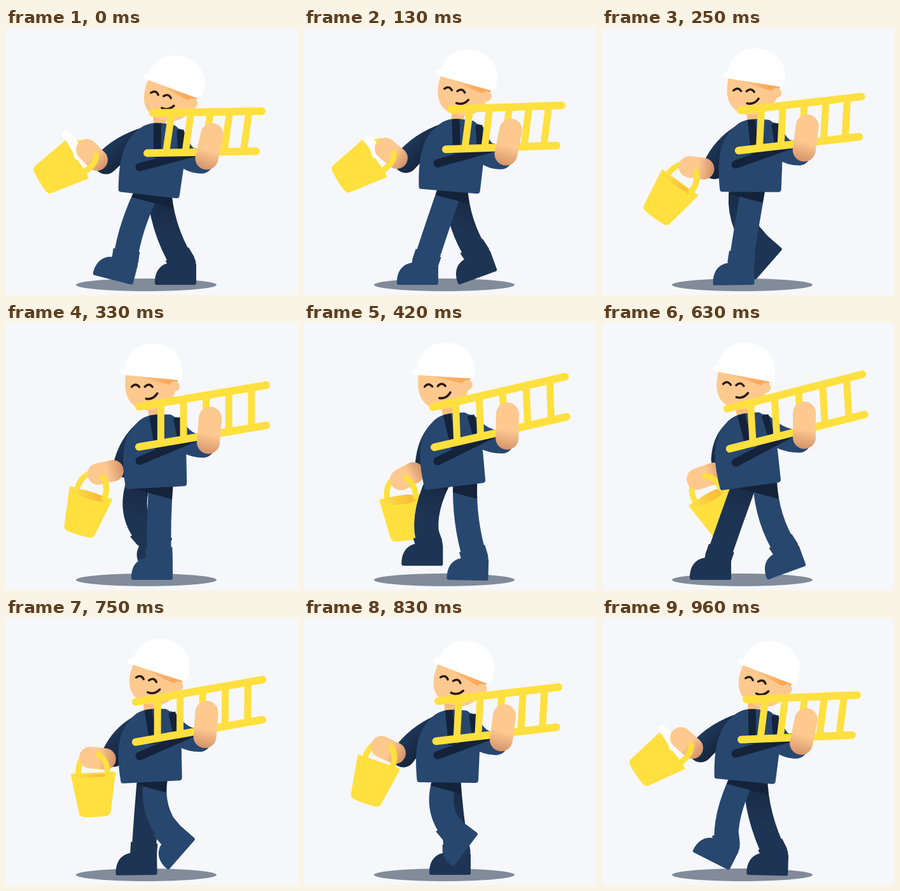
An HTML page with a canvas that plays this animation: 459 by 421 pixels, repeating every 1000 ms.

```html
<!DOCTYPE html>
<html lang="en">
<head>
<meta charset="utf-8">
<title>Walking builder</title>
<style>
  html, body { margin: 0; width: 100%; height: 100%; overflow: hidden; background: #f5f7fb; }
  canvas { display: block; }
</style>
</head>
<body>
<canvas id="stage" width="459" height="421"></canvas>
<script>
const ctx = document.getElementById('stage').getContext('2d');
const FPS = 24, LOOP = 1000, RAD = Math.PI / 180;

const C = {
  bg: '#f5f7fb', ground: '#818b9a', blue: '#27476f', navy: '#1e3454', dark: '#14233a',
  skin: '#fdc98f', tan: '#d4926a', orange: '#fba95c', yellow: '#ffe03f', ink: '#2c1a14'
};

// Periodic cubic through a few poses, positions counted in steps of the walk.
const tracks = (times, period) => (...vals) => k => {
  const n = times.length;
  const t = i => times[(i + n) % n] + Math.floor(i / n) * period;
  const v = i => vals[(i + n) % n];
  const slope = i => (v(i + 1) - v(i - 1)) / (t(i + 1) - t(i - 1));
  k = (k % period + period) % period;
  let i = n - 1;
  while (times[i] > k) i--;
  const h = t(i + 1) - t(i), u = (k - t(i)) / h, w = 1 - u;
  return v(i) * (1 + 2 * u) * w * w + slope(i) * h * u * w * w
       + v(i + 1) * (3 - 2 * u) * u * u - slope(i + 1) * h * u * u * w;
};
const track = tracks([0, 3, 8, 12, 15, 20, 23], 24);
const point = (xs, ys) => {
  const x = track(...xs), y = track(...ys);
  return k => [x(k), y(k)];
};

const bob = tracks([0, 3, 8, 11], 12)(6, 0, 2, 0);

const leg = {
  hip: track(226, 231, 244, 261, 256, 223, 222),
  knee: point([195, 210, 239, 260, 259, 204, 191], [310, 311, 310, 312, 310, 300, 312]),
  ankle: point([187, 190, 241, 293, 290, 235, 196], [368, 372, 372, 372, 359, 337, 359]),
  tilt: track(14.5, 0, 0, 0, -20, -53, 27),
  farHip: track(-20, -18, -14, -7, -6, -17, -17),
  farAnkle: track(-15, -17, -12, -11, -8, 0, -11),
  shade: track(272, 272, 270, 267, 267, 273, 273)
};
const torso = {
  x: track(224, 228, 236, 237.5, 233.5, 225.5, 224),
  y: 257.5,
  tilt: track(6.5, 4.8, -3, -10, -8, 0.6, 5.4)
};
const head = {
  at: point([262, 254, 228, 214.5, 222.5, 249, 260], [86, 83, 80, 81.5, 80.5, 82, 85]),
  tilt: track(20.5, 16, 5.5, 4, 11, 21.6, 21)
};
const ladder = {
  at: point([231, 231, 209, 198, 197, 211, 227], [128, 128, 130, 135, 135, 129, 128.5]),
  rail: point([171, 174, 200, 213, 212, 189, 174], [-3, -6, -34, -59, -54, -22, -7])
};
const grip = point([324, 325, 321, 319, 318, 315, 321], [162, 161, 148, 140, 142, 152, 160]);
const back = {
  elbow: point([157, 160, 187, 196, 190, 156, 155], [206, 210, 223, 219, 215, 215, 209]),
  wrist: point([143, 146, 168, 174, 176, 143, 142], [202, 205, 231, 239, 237, 211, 205]),
  hand: point([127, 128, 145, 157, 150, 122, 124], [186, 190, 236, 252, 246, 201, 189])
};
const bucket = {
  at: point([110, 110, 133, 172, 168, 117, 109], [202, 206, 268, 278, 273, 227, 210]),
  tilt: track(59, 58, 17, -28, -29, 19, 56),
  mouth: track(0, 0, 6, 8, 7, 0, 0),
  splash: track(34, 23, 0, 0, 0, 0, 29)
};

const shape = {
  foot: new Path2D('M18,33H-41Q-44,33 -44,30C-44,10 -34,0 -20,-2L0,-6L21,0V30Q21,33 18,33Z'),
  torso: new Path2D('M-44,0Q-48,0 -48,-4C-53,-55 -48,-84 -23,-105C-14,-113 0,-116 10,-115L28,-114C42,-110 50,-80 50,-49L48.5,-4Q48,0 44,0Z'),
  face: new Path2D('M-39,-4C-43,34 -30,55 -2,56C24,56 41,40 41,12V-4Z'),
  brow: new Path2D('M-24,0H44L40,13Q10,11 -24,3Z'),
  hat: new Path2D('M-46,4Q-50,3 -49,-1Q-48,-5 -42,-6C-42,-32 -22,-50 3,-50C29,-50 48,-32 48.5,-8V1Q48.5,4 45,4Z'),
  eyes: new Path2D('M-28.5,21.5Q-23,14 -16.5,20.5M-8,19.5Q-2,12 4,18.5'),
  mouth: new Path2D('M-4,38Q7,39 12.5,28'),
  bucket: new Path2D('M-35,-1Q-35,-3 -33,-3H33Q35,-3 35,0L25,60Q24,65 18,66Q0,68 -18,66Q-24,65 -25,60Z'),
  handle: new Path2D('M-23,-2C-23,-45 23,-45 23,0'),
  handleFront: new Path2D('M10,-31Q23,-23 23,0')
};

function place([x, y], deg, draw) {
  ctx.save();
  ctx.translate(x, y);
  ctx.rotate(deg * RAD);
  draw();
  ctx.restore();
}
function fill(path, color) {
  ctx.fillStyle = color;
  ctx.fill(path);
}
function stroke(path, color, width, cap = 'round') {
  ctx.strokeStyle = color;
  ctx.lineWidth = width;
  ctx.lineCap = cap;
  ctx.stroke(path);
}
function line(a, b, color, width, cap) {
  const p = new Path2D();
  p.moveTo(...a);
  p.lineTo(...b);
  stroke(p, color, width, cap);
}
function curve(a, c, b, color, width, cap) {
  const p = new Path2D();
  p.moveTo(...a);
  p.quadraticCurveTo(...c, ...b);
  stroke(p, color, width, cap);
}
function ellipse(x, y, rx, ry, color) {
  const p = new Path2D();
  p.ellipse(x, y, rx, ry, 0, 0, 7);
  fill(p, color);
}
function gradient(a, b, ...stops) {
  const g = ctx.createLinearGradient(...a, ...b);
  stops.forEach(([at, color]) => g.addColorStop(at, color));
  return g;
}
const add = ([x, y], dx, dy) => [x + dx, y + dy];

// Point of the rotated torso in stage coordinates.
function onTorso(k, x, y) {
  const a = torso.tilt(k) * RAD, c = Math.cos(a), s = Math.sin(a);
  return [torso.x(k) + x * c - y * s, torso.y + x * s + y * c];
}

function drawLeg(phase, hipDx, ankleDx, shadeY, color, soft) {
  const hip = [leg.hip(phase) + hipDx, 250];
  const knee = add(leg.knee(phase), (hipDx + ankleDx) / 2, 0);
  const ankle = add(leg.ankle(phase), ankleDx, 0);
  const g = gradient([253, shadeY - 48.3], [227, shadeY + 48.3],
    [0, C.dark], [0.5, C.dark], [0.505, soft || color], [0.95, color]);
  curve(hip, knee, ankle, g, 38, 'butt');
  const dx = ankle[0] - knee[0], dy = ankle[1] - knee[1], d = Math.hypot(dx, dy);
  line(add(ankle, -dx / d * 18, -dy / d * 18), ankle, color, 42, 'butt');
  ellipse(...ankle, 20.5, 20.5, color);
  place(ankle, leg.tilt(phase), () => fill(shape.foot, color));
}

function drawBucket(k) {
  place(bucket.at(k), bucket.tilt(k), () => {
    stroke(shape.handle, C.yellow, 9);
    fill(shape.bucket, C.yellow);
    const m = bucket.mouth(k), s = bucket.splash(k);
    if (m > 1) ellipse(0, 2, 30, m, gradient([-30, 0], [30, 0], [0, '#fde047'], [0.75, '#f8bd38'], [1, '#fde047']));
    if (s > 8) {
      curve([-8 - s, -7], [-20, -14], [-4, -6], '#fff', 13);
      curve([-8 - s, -5], [-16, -4], [10, -5], '#fff', 5);
    }
  });
}

function drawBackArm(k) {
  const elbow = back.elbow(k), wrist = back.wrist(k), hand = back.hand(k);
  const shoulder = onTorso(k, -14, -88);
  const mid = [(shoulder[0] + elbow[0]) / 2 - 7, (shoulder[1] + elbow[1]) / 2 - 7];
  const g = gradient(add(mid, -14, -14), add(mid, 22, 20), [0, '#203a5e'], [0.9, C.dark]);
  curve(shoulder, mid, elbow, g, 37);
  const skin = gradient(hand, add(wrist, (wrist[0] - hand[0]) * 0.7, (wrist[1] - hand[1]) * 0.7),
    [0.35, C.skin], [1, C.tan]);
  line(hand, wrist, skin, 34);
  place(bucket.at(k), bucket.tilt(k), () => stroke(shape.handleFront, C.yellow, 9));
}

function drawTorso(k) {
  line(onTorso(k, 4, -134), onTorso(k, 4, -108),
    gradient(onTorso(k, 4, -130), onTorso(k, 4, -112), [0, C.orange], [1, C.skin]), 20, 'butt');
  place([torso.x(k), torso.y], torso.tilt(k), () => fill(shape.torso, C.blue));
}

function drawHead(k) {
  place(head.at(k), head.tilt(k), () => {
    fill(shape.face, C.skin);
    fill(shape.brow, gradient([-24, 0], [24, 0], [0, C.skin], [1, C.orange]));
    ellipse(38.5, 14.5, 8, 8, C.skin);
    stroke(shape.eyes, C.ink, 3.4);
    stroke(shape.mouth, C.ink, 3.6);
    fill(shape.hat, '#fff');
  });
}

function drawFrontArm(k) {
  const top = grip(k), a = (torso.tilt(k) * 0.88 + 7) * RAD;
  const low = add(top, -38.5 * Math.sin(a), 38.5 * Math.cos(a));
  const elbow = add(low, -8, 6);
  curve(onTorso(k, 33, -92), add(elbow, -29, 0), elbow, C.blue, 36);

  const start = ladder.at(k), [rx, ry] = ladder.rail(k);
  const vx = (rx - 200) * 0.31, vy = 63.3;
  const base = add(start, vx, vy);
  line(onTorso(k, 1, -114), onTorso(k, 7, -60), C.dark, 12, 'butt');
  line(onTorso(k, 38, -108), onTorso(k, 44, -70), C.dark, 11, 'butt');
  line([210, base[1] + 22], [298, base[1] + ry / rx * (298 - base[0])], C.dark, 13);

  for (let i = 0; i < 5; i++) {
    const f = 0.172 + 0.178 * i, p = add(start, rx * f, ry * f);
    line(p, add(p, vx, vy), C.yellow, 11, 'butt');
  }
  line(start, add(start, rx, ry), C.yellow, 12);
  line(base, add(base, rx, ry), C.yellow, 12);

  line(top, low, gradient(top, add(low, -8, 17), [0.45, C.skin], [1, C.tan]), 36);
}

function draw(k) {
  const lift = bob(k);
  const raised = part => {
    ctx.save();
    ctx.translate(0, lift);
    part(k);
    ctx.restore();
  };
  ctx.fillStyle = C.bg;
  ctx.fillRect(0, 0, 459, 421);
  ellipse(220.5, 405, 110.5, 10, C.ground);
  raised(drawBucket);
  raised(drawBackArm);
  const shadeY = leg.shade(k) + lift;
  drawLeg(k + FPS / 2, leg.farHip(k), leg.farAnkle(k), shadeY, C.navy, '#192c48');
  drawLeg(k, 0, 0, shadeY, C.blue);
  raised(drawTorso);
  raised(drawHead);
  raised(drawFrontArm);
}

// Steps start on whole hundredths of a second.
function stepAt(ms) {
  let k = Math.floor(ms * FPS / 1000 + 0.15);
  if (Math.round(k * 100 / FPS) * 10 > ms) k--;
  return k;
}

const t0 = performance.now();
function tick() {
  draw(stepAt((performance.now() - t0) % LOOP));
  requestAnimationFrame(tick);
}
tick();
</script>
</body>
</html>
```
